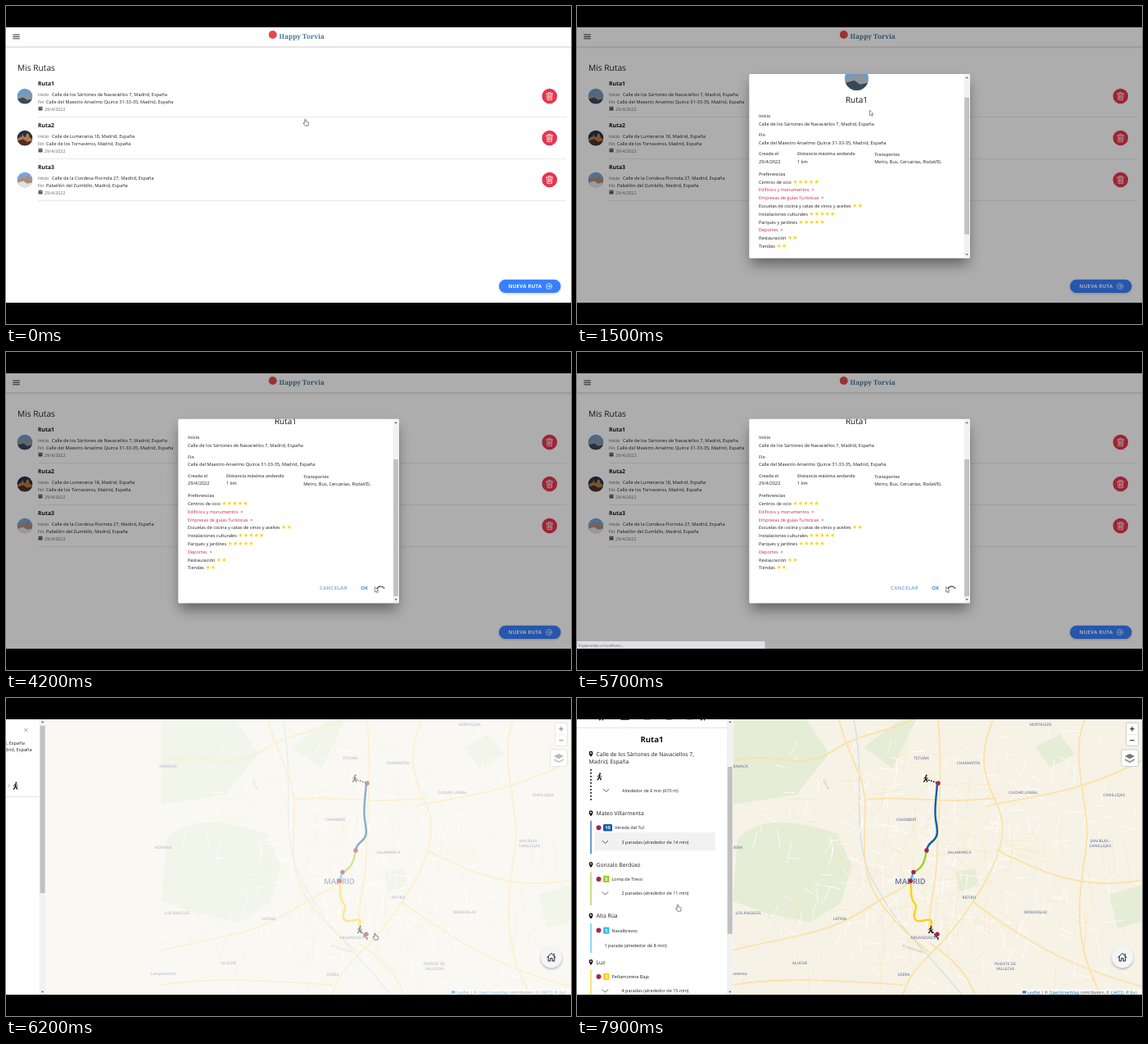
These frames come from a looping animation (690x388 px, 8000 ms). An HTML page:

```html
<!DOCTYPE html>
<html lang="es">
<head>
<meta charset="utf-8">
<title>Mis Rutas</title>
<style>
html, body { margin: 0; width: 100%; height: 100%; overflow: hidden; background: #000; }
svg { display: block; width: 100vw; height: 100vh; }
text { font-family: "Open Sans", "Noto Sans", sans-serif; text-rendering: geometricPrecision; white-space: pre; }
.b { font-weight: 700; }
.m { text-anchor: middle; }
.star { font-family: "DejaVu Sans", sans-serif; font-size: 7.2px; fill: #ffd21a; }
.brand { font-family: "Noto Serif", serif; font-weight: 700; }
.line { fill: none; stroke-linecap: round; stroke-linejoin: round; }
</style>
</head>
<body>
<svg id="stage" viewBox="0 0 690 388"></svg>
<script>
const LOOP = 8000;
const METRO = '#a3264f';
const START = 'Calle de los Sártones de Navaciellos 7,';
const CITY = 'Madrid, España';
const END = 'Calle del Maestro Anselmo Quirce 31-33-35, ' + CITY;

// Drawing helpers
const text = (x, y, s, size = 5.6, fill = '#222', cls = '', more = '') =>
  `<text x="${x}" y="${y}" font-size="${size}" fill="${fill}" class="${cls}" ${more}>${s}</text>`;
const rect = (x, y, w, h, fill, rx = 0, more = '') =>
  `<rect x="${x}" y="${y}" width="${w}" height="${h}" fill="${fill}" rx="${rx}" ${more}/>`;
const dot = (x, y, r, fill, more = '') => `<circle cx="${x}" cy="${y}" r="${r}" fill="${fill}" ${more}/>`;
const line = (d, color, w = 1, more = '') =>
  `<path class="line" d="${d}" stroke="${color}" stroke-width="${w}" ${more}/>`;
const group = (id, body, more = '') => `<g id="${id}" ${more}>${body}</g>`;
const at = (x, y, body, k = 1) => `<g transform="translate(${x} ${y}) scale(${k})">${body}</g>`;

const photo = (x, y, r, [sky, far, near]) => at(x, y,
  dot(0, 0, 1, sky) +
  `<path fill="${far}" d="M-.98 .2L-.7-.1-.4-.2-.3-.6-.15-.2 .1-.1 .2-.5 .5-.6 .6-.1 .98 .2A1 1 0 0 1-.98 .2"/>` +
  `<path fill="${near}" d="M-.93 .37L-.2 .15 .3 .5 .93 .37A1 1 0 0 1-.93 .37"/>`, r);
const walker = (x, y) => at(x, y,
  dot(.6, -3.5, 1, '#111') + line('M0-1.8L-.3 .8M-.3 .8L1.2 2 1.6 4M-.3 .8L-1 2.5-2.4 4', '#111', 1.3) +
  line('M0-1.8L-1.9-.8-2.2 .5M0-1.8L1.2-.5 2.4-.1', '#111', .8));
const pin = (x, y) => `<path fill="#111" fill-rule="evenodd" d="M${x} ${y + 3.5}c-1.6-2.2-2.4-3.2-2.4-4.6a2.4 2.4 0 0 1 4.8 0c0 1.4-.8 2.4-2.4 4.6zm0-5.5a.9 .9 0 1 0 .01 0z"/>`;
const badge = (x, y, n, fill) => {
  const w = n > 9 ? 11 : 7.5;
  return rect(x, y - 4.2, w, 8.4, fill, 1.3) + text(x + w / 2, y + 2, n, 5.6, '#fff', 'b m');
};
const chevron = (x, y) => line(`M${x - 3.3} ${y - 1.6}l3.3 3.3 3.3-3.3`, '#333', .8);

// Route list page
const PHOTOS = [['#6c9bc9', '#8d969c', '#38485a'], ['#26304a', '#b47a43', '#4a3027'], ['#79a5d9', '#b58a70', '#dfe3e8']];
const ROUTES = [
  [START + ' ' + CITY, END],
  ['Calle de Lumerania 18, ' + CITY, 'Calle de los Tornaveros, ' + CITY],
  ['Calle de la Condesa Florinda 27, ' + CITY, 'Pabellón del Zumbillo, ' + CITY],
];
const trash = (x, y) => dot(x, y, 9.3, '#e5364f') + line(
  `M${x - 4} ${y - 3}h8M${x - 1.4} ${y - 3}v-1.4h2.8v1.4M${x - 3.2} ${y - 3}l.5 7.6h5.4l.5-7.6M${x} ${y - 1.2}v4M${x - 1.4} ${y - 1.2}l.1 4M${x + 1.4} ${y - 1.2}l-.1 4`, '#fff', .75);
const row = ([from, to], i) => at(0, i * 51,
  photo(23, 110, 9.3, PHOTOS[i]) + text(39, 97.2, 'Ruta' + (i + 1), 6.8, '#111', 'b') +
  text(39, 110, 'Inicio', 5.4, '#555') + text(56, 110, from) +
  text(39, 118.6, 'Fin', 5.4, '#555') + text(49, 118.6, to) +
  rect(39.5, 122.8, 5, 4.8, '#555', .7) + line('M40 124.3h4', '#fff', .4) +
  text(47, 128, '29/4/2022', 5.4, '#666') +
  trash(663.8, 110) + rect(39, 135.2, 645, .6, '#dcdcdc'));

const list =
  rect(0, 26, 690, 336, '#fff') + rect(0, 49.6, 690, .9, '#c4c4c4') + rect(0, 50.5, 690, 1, '#eee') +
  [35, 37.4, 39.8].map(y => rect(8.3, y - .5, 8.5, 1, '#333')).join('') +
  dot(325.8, 35, 5, '#e4484f') + text(333.5, 39.6, 'Happy Torvia', 8.1, '#4b7699', 'brand') +
  text(14, 78.5, 'Mis Rutas', 10.2) + ROUTES.map(row).join('') +
  rect(602, 335, 75.5, 16.2, '#000', 8, 'opacity=".18" filter="url(#soft)"') +
  rect(602, 333.8, 75.5, 16.2, '#3880ff', 8) +
  text(613.5, 344.3, 'NUEVA RUTA', 6, '#fff', 'b', 'letter-spacing=".3"') +
  line('M666.6 342a3.5 3.5 0 1 1-7 0a3.5 3.5 0 1 1 7 0M661.2 342h3.6M663.4 340.5l1.5 1.5-1.5 1.5', '#fff', .7);

// Details dialog, laid out at its fully scrolled position
const GREY = '#666', RED = '#c9283e';
const PREFS = [['Centros de ocio', 5], ['Edificios y monumentos', 0], ['Empresas de guías Turísticas', 0],
  ['Escuelas de cocina y catas de vinos y aceites', 2], ['Instalaciones culturales', 5],
  ['Parques y jardines', 5], ['Deportes', 0], ['Restauración', 2], ['Tiendas', 2]];
const pref = ([name, n], i) => text(222, 187 + i * 9.8,
  n ? `${name} <tspan class="star">${'★'.repeat(n)}</tspan>` : `${name}  ×`, 5.5, n ? '#222' : RED);
const label = (x, y, s) => text(x, y, s, 5.2, GREY, 'b');
const dialog =
  rect(212, 92, 266, 222, '#000', 2, 'opacity=".42" filter="url(#wide)"') +
  rect(210.3, 81.8, 269.7, 224.7, '#fff', 1.5) +
  `<g clip-path="url(#dialogClip)">` + group('dialogBody',
    photo(341.5, 59, 14.5, PHOTOS[0]) + text(341.5, 88, 'Ruta1', 10, '#111', 'm', 'font-weight="500"') +
    label(222, 106, 'Inicio') + text(222, 116, START + ' ' + CITY) +
    label(222, 129.8, 'Fin') + text(222, 139, END) +
    label(222, 152.8, 'Creada el') + text(222, 162, '29/4/2022') +
    label(269, 152.8, 'Distancia máxima andando') + text(269, 162, '1 km') +
    label(363.3, 153.6, 'Transportes') + text(363.3, 162.8, 'Metro, Bus, Cercanías, RodaVEL') +
    label(222, 177, 'Preferencias') + PREFS.map(pref).join('') +
    text(400, 290, 'CANCELAR', 6, '#8db0e6', 'b m', 'letter-spacing=".3"') +
    rect(426, 279.3, 23.2, 16.2, '#dbe8fd', 1, 'id="okGlow"') +
    text(437.6, 290, 'OK', 6, '#4a8af0', 'b m')) + '</g>' +
  rect(472.6, 82.5, 7, 223.5, '#f1f1f1') + rect(473.2, 90, 5.8, 167, '#c1c1c1', 0, 'id="dialogThumb"') +
  `<path fill="#505050" d="M474.4 87l1.7-1.8 1.7 1.8zM474.4 301.3l1.7 1.8 1.7-1.8z"/>`;

// Map page
let seed = 7;
const rnd = () => (seed = seed * 16807 % 2147483647) / 2147483647;
const streets = (count, cx, cy, sx, sy, len) => {
  let d = '';
  for (let i = 0; i < count; i++) {
    const x = cx + (rnd() + rnd() - 1) * sx, y = cy + (rnd() + rnd() - 1) * sy;
    const a = .25 + (rnd() < .5 ? 0 : Math.PI / 2) + (rnd() - .5) * .9, l = len * (.3 + rnd());
    d += `M${x.toFixed(1)} ${y.toFixed(1)}q${(Math.cos(a) * l / 2 + rnd() * 4).toFixed(1)} ${(Math.sin(a) * l / 2).toFixed(1)} ${(Math.cos(a) * l).toFixed(1)} ${(Math.sin(a) * l).toFixed(1)}`;
  }
  return d;
};
const LABELS = [['HORTALEZA', 566, 32], ['TETUÁN', 420.5, 73.5], ['CHAMARTÍN', 478, 79], ['CIUDAD LINEAL', 545, 115],
  ['CANILLEJAS', 656, 118.5], ['CHAMBERÍ', 402, 148], ['SALAMANCA', 467, 188.5], ['SAN BLAS -', 639, 174],
  ['CANILLEJAS', 639, 180.5], ['RETIRO', 479, 243], ['LATINA', 321, 269], ['MORATALAZ', 560, 261],
  ['ARGANZUELA', 423, 292], ['PUENTE DE', 523, 324], ['VALLECAS', 523, 330], ['ALUCHE', 272, 323],
  ['USERA', 399, 337], ['LOS ÁNGELES', 209, 262], ['HÚMERA', 192, 182.5], ['ARAVACA', 198, 83], ['Campamento', 192, 336.5]];
const HIGHWAYS = 'M508 26C490 70 496 95 513 130S510 205 494 232 460 285 432 312 405 345 398 362' +
  'M190 78C240 62 270 92 310 66S370 46 410 26M320 26C330 70 352 95 352 130S346 205 362 235 400 285 432 312' +
  'M190 308C250 292 300 290 345 262S390 238 407 224M500 132C560 118 610 118 690 76' +
  'M512 185C570 215 620 235 690 222M485 250C540 290 590 325 690 352M432 300C460 318 478 340 486 362' +
  'M620 26C600 75 628 130 622 180S600 290 640 362M441 26C447 90 440 160 440 190S432 240 430 280' +
  'M352 124C390 118 450 130 513 122M190 350C250 340 320 345 398 350';
const map =
  rect(0, 26, 690, 336, '#f7f2e6') +
  `<path fill="#e5edd6" d="M196 172C225 140 280 152 318 166L336 205 322 250 285 274 230 262 190 248zM190 26h90l28 42-40 50-78 12zM462 212l24-4 5 22-25 6zM350 60l45-34h20l-30 60zM560 60l30-16 18 25-30 16zM650 240l40-12v45l-30 8z"/>` +
  `<path class="line" stroke="#c9dfe6" stroke-width="1.2" d="M338 26C355 110 330 170 365 230S410 290 470 362"/>` +
  line(streets(330, 450, 190, 250, 175, 20), '#fff', .8) +
  line(streets(130, 450, 200, 240, 170, 38), '#f6e7bd', .7) +
  line(streets(60, 250, 220, 75, 130, 28), '#eeeadb', .6) +
  line(HIGHWAYS, '#f7dd94', 1.6) + line(HIGHWAYS, '#fbeab9', .7) +
  LABELS.map(([s, x, y]) => text(x, y + 1.8, s, 4.8, '#7381a5', 'm', 'font-weight="600"')).join('') +
  text(407, 227.4, 'MADRID', 9.4, '#62719a', 'm', 'font-weight="600"') +
  text(300, 100, 'Calle 30', 3.6, '#aaa', '', 'transform="rotate(62 300 100)"') +
  text(397, 303, 'Río Manzanares', 3.6, '#9aa', '', 'transform="rotate(18 397 303)"') +
  line('M440 104C439 120 436 135 438 148S442 168 435 174 428 182 427 186', '#0e5ca8', 2.4) +
  line('M427 186C425 196 424 207 411 212.5', '#9fd129', 2.4) +
  line('M411 212.5L407.5 223', '#3fc0ee', 2.4) +
  line('M407.5 223C409 233 406 243 412 250S408 263 413 270 432 265 433 274L432 281', '#fbd01c', 2.4) +
  line('M427 99.5L440 103.5M433 284L441 293', '#111', 1.8, 'stroke-dasharray="0 3"') +
  line('M436 291l6-3M438 288l3 7', '#222', 1) +
  [[441, 104], [427, 186], [411, 212.5], [407.5, 223.2], [440, 288.3]].map(([x, y]) => dot(x, y, 2.7, METRO)).join('') +
  walker(426, 98) + walker(432, 282.5) +
  rect(670.6, 30.4, 14.8, 28, '#fff', 1.6, 'stroke="#bbb" stroke-width=".7"') + rect(671, 44.2, 14, .5, '#ccc') +
  line('M675.7 37.7h4.6M678 35.4v4.6M675.7 51.7h4.6', '#111', 1.1) +
  rect(664.8, 63, 20.6, 20.4, '#fff', 1.8, 'stroke="#bbb" stroke-width=".7"') +
  `<path fill="#999" d="M675 77l-6-3v2l6 3.2 6-3.2v-2z"/><path fill="#777" d="M675 68l6 3-6 3.2-6-3.2z"/>` +
  rect(542.5, 355.7, 148, 6.3, '#fff', 0, 'opacity=".8"') + rect(544, 357.2, 4.6, 3.4, '#4c7be1') +
  text(550, 360.8, '<tspan fill="#0078a8" text-decoration="underline">Leaflet</tspan> | © <tspan fill="#0078a8" text-decoration="underline">OpenStreetMap</tspan> contributors, © <tspan fill="#0078a8" text-decoration="underline">CARTO</tspan>, © <tspan fill="#0078a8" text-decoration="underline">Esri</tspan>', 5, '#333');

// Side panel
const LINES = { 10: '#0e5ca8', 5: '#9fd129', 1: '#3fc0ee', 3: '#fbd01c' };
const stop = (y, name, n, dir, info, fold = true) =>
  pin(17, y) + text(23.5, y + 2.4, name, 6.8) + rect(16.4, y + 9, 1.2, fold ? 40.5 : 36, LINES[n]) +
  dot(26.5, y + 17.5, 3, METRO) + badge(32, y + 17.5, n, LINES[n]) +
  text(n > 9 ? 46 : 42.5, y + 19.5, dir, 5.5) +
  (fold ? chevron(34.5, y + 35) + text(54.5, y + 37, info, 5.5) : text(33.5, y + 38, info, 5.5));
const panel =
  rect(0, 26, 190.5, 336, '#fff') + '<g clip-path="url(#panelClip)">' + group('panelBody',
    text(7, 42.3, 'Detalles de la ruta', 9.6) + line('M164.8 37.3l3.6 3.6m0-3.6l-3.6 3.6', '#666', .6) +
    text(7, 57.4, 'Inicio', 5.3, '#999') + text(22, 57.4, START + ' ' + CITY, 5.7) +
    text(7, 65.4, 'Fin', 5.3, '#999') + text(16, 65.4, END, 5.7) +
    text(91.5, 81.8, '22:37 - 23:40', 7.7, '#111', 'm', 'font-weight="600"') + text(91.5, 91.6, '1 h 3 min', 7, '#777', 'm') +
    walker(30, 107) + walker(154, 107) +
    [38.5, 69, 95, 122, 146].map(x => line(`M${x - .8} 105.2l1.5 1.7-1.5 1.7`, '#777', .6)).join('') +
    [[47, 10], [76, 5], [102.5, 1], [128, 3]].map(([x, n]) => dot(x, 107, 3, METRO) + badge(x + 6, 107, n, LINES[n])).join('') +
    rect(0, 120, 183, .7, '#d5d5d5') + text(91.5, 138, 'Ruta1', 9.6, '#111', 'b m') +
    pin(17, 152.5) + text(23.5, 155, START, 6.76) + text(14.5, 164.6, CITY, 6.76) +
    line('M17 172V212', '#111', 2, 'stroke-dasharray="0 4"') + walker(27.5, 180) +
    chevron(35.5, 197) + text(55, 199.4, 'Alrededor de 8 min (670 m)', 5.4) +
    rect(22, 248.3, 147, 22, '#f1f1f1', 1, 'id="hover"') +
    stop(225, 'Mateo Villarmenta', 10, 'Vereda del Tul', '3 paradas (alrededor de 14 min)') +
    stop(287.6, 'Gonzalo Berdúez', 5, 'Loma de Trevo', '2 paradas (alrededor de 11 min)') +
    stop(350.3, 'Alta Rúa', 1, 'Navalbrezos', '1 parada (alrededor de 8 min)', false) +
    stop(406.6, 'Luz', 3, 'Peñamorena Baja', '4 paradas (alrededor de 15 min)')) + '</g>' +
  rect(183, 26, 7.5, 336, '#f1f1f1') + rect(183.8, 34, 6, 204, '#c1c1c1', 0, 'id="panelThumb"') +
  `<path fill="#505050" d="M185.2 30l1.6-1.8 1.6 1.8zM185.2 357.7l1.6 1.8 1.6-1.8z"/>`;

const home = dot(666, 318, 13, '#000', 'opacity=".25" filter="url(#soft)"') + dot(666, 316.3, 13, '#f4f5f8') +
  line('M660.8 316.5l5.2-5 5.2 5M662.3 315.4v5.6h2.5v-3.4h2.4v3.4h2.5v-5.6M669.2 312v2.3', '#222', 1);
const opener = rect(5.5, 184, 19, 12.5, '#000', 1, 'opacity=".25" filter="url(#soft)"') +
  rect(5.5, 183, 19, 12.5, '#f4f5f8', 1) + line('M13.8 187l2.3 2.3-2.3 2.3', '#222', 1);
const status = rect(0, 353, 229.5, 9, '#dfe1e5', 1) + text(2, 359.8, 'Esperando a localhost...', 5, '#666');

const arrow = '<path d="M0 0v6.6l1.6-1.4 1 2.3 1-.4-1-2.2h2z" fill="#fff" stroke="#333" stroke-width=".5"/>';
const hand = '<path d="M-.7 5.2L-.7 1q.7-1 1.4 0v2.3l3 .8q.6 .3 .4 1.5l-.6 3H-.3L-2.3 5.6q0-1 .8-.7z" fill="#fff" stroke="#333" stroke-width=".6"/>';

const stage = document.getElementById('stage');
stage.innerHTML = `<defs>
  <filter id="soft" x="-30%" y="-60%" width="160%" height="220%"><feGaussianBlur stdDeviation="1.6"/></filter>
  <filter id="wide" x="-20%" y="-20%" width="140%" height="140%"><feGaussianBlur stdDeviation="8"/></filter>
  <clipPath id="dialogClip">${rect(210.3, 81.8, 262, 224.7)}</clipPath>
  <clipPath id="panelClip">${rect(0, 26, 183, 336)}</clipPath>
  <clipPath id="view">${rect(0, 26, 690, 336)}</clipPath></defs>` +
  rect(0, 0, 690, 388, '#000') + '<g clip-path="url(#view)">' +
  group('listPage', list + rect(0, 26, 690, 336, '#000', 0, 'id="shade"') + group('dialog', dialog)) +
  group('mapPage', rect(0, 26, 690, 336, '#fff') + group('map', map) + group('opener', opener) +
    group('panel', panel) + home) +
  group('status', status) +
  group('spinner', line('M-4.75-2.1A5.2 5.2 0 0 0 4.75-2.1', '#222', 1, 'transform="scale(1 -1)"')) +
  group('arrow', arrow) + group('hand', hand) + '</g>';

// Animation
const el = {};
stage.querySelectorAll('[id]').forEach(e => el[e.id] = e);
const ramp = (t, a, b) => Math.min(1, Math.max(0, (t - a) / (b - a)));
const ease = (t, a, b) => { const p = ramp(t, a, b); return p * p * (3 - 2 * p); };
const move = (name, x, y, turn = 0) => el[name].setAttribute('transform', `translate(${x} ${y}) rotate(${turn})`);
const fade = (name, o) => el[name].setAttribute('opacity', o);
const show = (name, on) => el[name].style.display = on ? '' : 'none';

function pointer(t) {
  const path = [[50, 200, 365.5, 137.5, 357.5, 127], [1750, 2400, 357.5, 127, 450.5, 286.5],
    [6200, 6201, 450.5, 286.5, 449.5, 282.5], [6700, 7400, 449.5, 282.5, 123, 251.5]];
  const [a, b, x0, y0, x1, y1] = path.filter(s => t >= s[0]).pop() || path[0];
  const p = ease(t, a, b);
  return [x0 + (x1 - x0) * p, y0 + (y1 - y0) * p];
}

function draw(t) {
  const onMap = t >= 5850, loaded = t >= 6200;
  show('listPage', !onMap);
  show('mapPage', onMap);

  const open = ramp(t, 500, 700), scroll = ease(t, 1400, 1600);
  fade('shade', .32 * open);
  fade('dialog', open);
  move('dialog', 0, 2.3 * (1 - scroll));
  move('dialogBody', 0, 56.7 * (1 - scroll));
  move('dialogThumb', 0, 41 * scroll);
  fade('okGlow', ramp(t, 2200, 2400) * (1 - ramp(t, 3400, 3600)));

  show('spinner', t >= 2600 && !onMap);
  move('spinner', 457, 287, (t - 2700) / 750 * 360 - 8);
  show('status', t >= 5300 && !loaded);

  fade('map', ramp(t, 6100, 6300));
  show('opener', !loaded);
  move('panel', -192 * (1 - ease(t, 6100, 6400)), 0);
  const slide = ease(t, 7500, 7900);
  move('panelBody', 0, -84.2 * slide);
  move('panelThumb', 0, 50 * slide);
  show('hover', t >= 7300);

  const [x, y] = pointer(t), isHand = t < 600 || loaded;
  show('hand', isHand);
  show('arrow', !isHand);
  move('hand', x, y);
  move('arrow', x, y);
}

function tick() {
  draw(Math.floor(performance.now() % LOOP / 100) * 100);
  requestAnimationFrame(tick);
}
tick();
</script>
</body>
</html>
```
